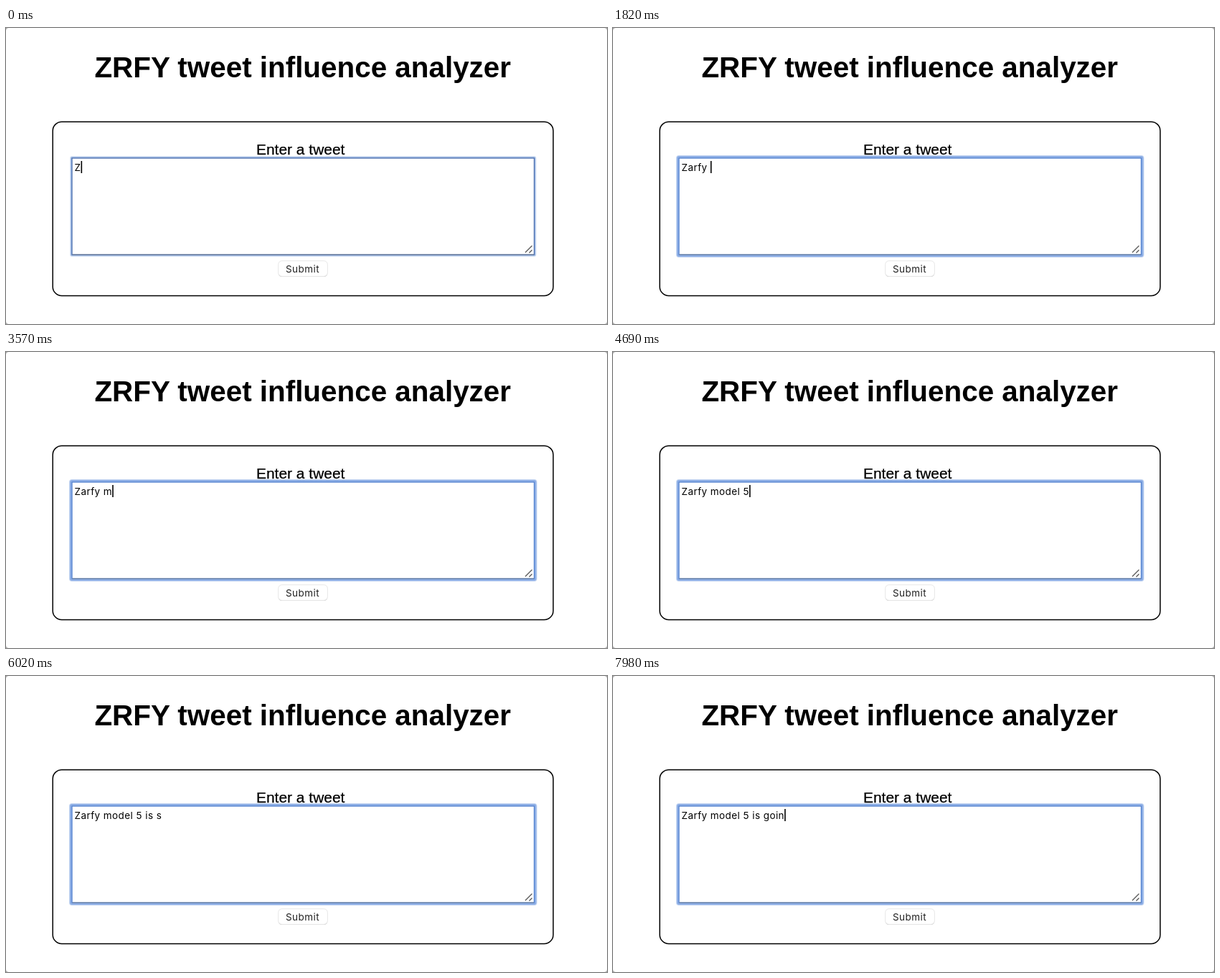
Write an HTML page that moves like this. It is 838 px wide and 414 px high and loops after 8 s.

```html
<!DOCTYPE html>
<html lang="en">
<head>
<meta charset="utf-8">
<title>Tweet influence analyzer</title>
<style>
  html, body { margin: 0; width: 100%; height: 100%; overflow: hidden; background: #fff; }
  svg { display: block; width: 838px; height: 414px; }
  .heading { font: bold 40.4px "Liberation Sans", Arial, sans-serif; }
  .label { font: 20.95px "Liberation Sans", Arial, sans-serif; stroke: #000; stroke-width: .25px; }
  .control { font: 13.5px Inter, sans-serif; letter-spacing: .43px; white-space: pre; }
</style>
</head>
<body>
<svg viewBox="0 0 838 414">
  <!-- window with rounded corners -->
  <rect width="838" height="414" fill="#a6a6a6"/>
  <rect width="838" height="414" rx="4" fill="#fff"/>

  <text class="heading" x="123.4" y="69">ZRFY tweet influence analyzer</text>
  <rect x="65.2" y="131.2" width="697.8" height="243.3" rx="12.5" fill="#fff" stroke="#000" stroke-width="1.5"/>
  <text class="label" x="349" y="177">Enter a tweet</text>

  <!-- text area with a soft focus ring -->
  <rect id="halo" fill-opacity=".5"/>
  <rect id="glow"/>
  <rect id="field" x="92" y="182" width="644.5" height="135" fill="#fff" stroke-width="1.3"/>
  <path d="M92.5 317H736" stroke="#7d8798" stroke-width="1.2"/>
  <path d="M724 314L733.5 304.5M729.5 314.5L733.5 310.5" stroke="#555" stroke-width="1.3"/>
  <text id="entry" class="control" x="95.5" y="199.7"></text>
  <rect id="caret" y="186" width="1.6" height="17"/>

  <!-- button -->
  <rect x="379.7" y="326.3" width="68.6" height="21.8" rx="5" fill="#d0d0d0"/>
  <rect x="379.7" y="325.7" width="68.6" height="21.6" rx="5" fill="#fff" stroke="#e8e8e8"/>
  <text class="control" x="390" y="342" fill="#222">Submit</text>
</svg>
<script>
const LOOP = 8000, FOCUS_AT = 1820;
const BLINK = '|', BACKSPACE = '<';

// Time in ms and the keys pressed then.
const keys = [
  [0, 'Z'], [140, 'a'], [350, 'r'], [630, 'f'], [770, 'y'], [1260, BLINK], [1330, ' '],
  [1890, BLINK], [2450, BLINK], [2940, BLINK], [3500, BLINK],
  [3570, 'm'], [3780, 'o'], [3920, 'd'], [4060, 'e'], [4130, 'l'],
  [4480, ' '], [4690, '5'], [4830, ' '],
  [5110, 'i'], [5250, 's'], [5390, ' '], [5530, 's'], [6020, BLINK],
  [6300, BACKSPACE], [6440, 'go'], [6580, 'i'], [7140, BLINK],
  [7420, 'n'], [7560, 'g'], [7980, BACKSPACE]
];

const [halo, glow, field, entry, caret] =
  ['halo', 'glow', 'field', 'entry', 'caret'].map(id => document.getElementById(id));

function setAttributes(node, values) {
  for (const name in values) node.setAttribute(name, values[name]);
}

function typedAt(time) {
  let text = '', caretOn = true;
  for (const [at, key] of keys) {
    if (at > time) break;
    if (key === BLINK) { caretOn = !caretOn; continue; }
    text = key === BACKSPACE ? text.slice(0, -1) : text + key;
    caretOn = true;
  }
  return { text, caretOn };
}

function drawRing(ring, spread, fill) {
  setAttributes(ring, {
    x: 92 - spread, y: 182 - spread,
    width: 644.5 + 2 * spread, height: 135 + 2 * spread,
    rx: spread, fill
  });
}

function drawFocus(bright) {
  const spread = bright ? 3 : 1.8;
  const color = bright ? '#8eafe6' : '#9db9e4';
  drawRing(halo, spread + 1, color);
  drawRing(glow, spread, color);
  field.setAttribute('stroke', bright ? '#5281cf' : '#4c6fae');
}

function draw() {
  const time = performance.now() % LOOP;
  const { text, caretOn } = typedAt(time);
  entry.textContent = text;
  setAttributes(caret, {
    x: 95.6 + entry.getComputedTextLength(),
    visibility: caretOn ? 'visible' : 'hidden'
  });
  drawFocus(time >= FOCUS_AT);
  requestAnimationFrame(draw);
}
draw();
</script>
</body>
</html>
```
